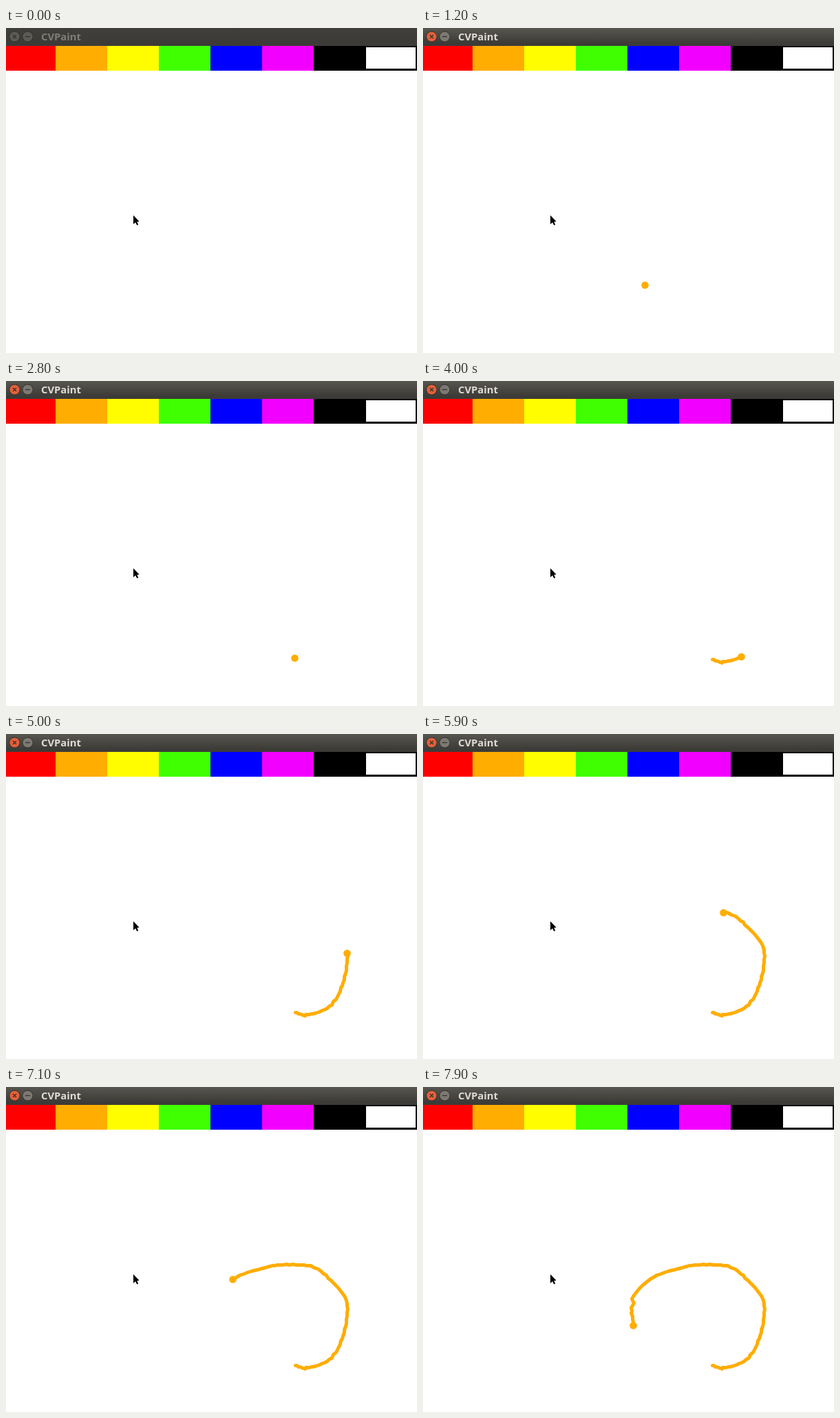
These frames come from a looping animation (597 by 472 pixels, 8000 ms). An HTML page with a canvas:

```html
<!DOCTYPE html>
<html lang="en">
<head>
<meta charset="utf-8">
<title>CVPaint</title>
<style>
  html, body { margin: 0; width: 100%; height: 100%; overflow: hidden; background: #fff; }
  canvas { display: block; }
</style>
</head>
<body>
<canvas id="stage" width="597" height="472"></canvas>
<script>
const ctx = document.getElementById('stage').getContext('2d');
const LOOP = 8000, STEP = 100, INK = '#ffad00';
const HOVER_START = 10, DRAW_START = 29;
const palette = ['#ff0000', INK, '#fffd00', '#40ff00', '#0000ff', '#f200ff'];

// Key poses of the brush: [step, x, y]
const hover = [[10, 318, 435], [12, 322, 373], [14, 336, 348], [18, 379, 370], [28, 419, 402]];
const stroke = [
  [29, 420, 404], [32, 432, 408], [36, 438, 407], [40, 462, 400], [43, 481, 381],
  [47, 493, 347], [50, 495, 318], [52, 491, 303], [54, 478, 287], [57, 457, 267],
  [59, 436, 259], [63, 398, 258], [68, 360, 266], [71, 329, 279], [74, 303, 307],
  [75, 306, 313], [76, 302, 320], [79, 305, 346]
];

// Smooth curve through the key poses
function pose(keys, step) {
  const i = Math.max(1, keys.findIndex(key => key[0] >= step));
  const a = keys[i - 1], b = keys[i];
  const before = keys[i - 2] || a, after = keys[i + 1] || b;
  const span = b[0] - a[0], k = (step - a[0]) / span;
  return [1, 2].map(axis => {
    const slopeA = (b[axis] - before[axis]) / (b[0] - before[0]) * span;
    const slopeB = (after[axis] - a[axis]) / (after[0] - a[0]) * span;
    const ease = k * k * (3 - 2 * k);
    return a[axis] + (b[axis] - a[axis]) * ease
      + slopeA * k * (1 - k) ** 2 - slopeB * k * k * (1 - k);
  });
}

// Slight hand tremor between whole steps, on the pixel grid
function trail(end) {
  const points = [];
  for (let s = DRAW_START; s <= end; s += 0.5) {
    const [x, y] = pose(stroke, s), shake = s % 1 ? 0.7 : 0;
    points.push([Math.round(x + shake * Math.sin(s * 7)), Math.round(y + shake * Math.cos(s * 5))]);
  }
  return points;
}

function disc(x, y, r, fill) {
  ctx.fillStyle = fill;
  ctx.beginPath();
  ctx.arc(x, y, r, 0, Math.PI * 2);
  ctx.fill();
}

function path(points) {
  ctx.beginPath();
  points.forEach(([x, y]) => ctx.lineTo(x, y));
}

function button(x, fill, glyph) {
  disc(x, 12.5, 7.9, '#33322e');
  disc(x, 12.5, 7.1, fill);
  ctx.strokeStyle = '#33322e';
  ctx.lineWidth = 1.3;
  ctx.stroke(new Path2D(glyph));
}

function titleBar(active) {
  const shade = ctx.createLinearGradient(0, 0, 0, 22);
  shade.addColorStop(0, active ? '#57564f' : '#403f3b');
  shade.addColorStop(1, '#3c3b37');
  ctx.fillStyle = shade;
  ctx.fillRect(0, 0, 597, 26);
  button(12.5, active ? '#e4603a' : '#5c5b56', 'M10 10l5 5M15 10l-5 5');
  button(31.5, active ? '#7b7971' : '#5c5b56', 'M28 12.5h7');
  ctx.fillStyle = active ? '#dfdbd2' : '#807d78';
  ctx.font = 'bold 14.8px "Open Sans", sans-serif';
  ctx.fontKerning = 'none';
  ctx.fillText('CVPaint', 51, 18);
}

function swatches() {
  ctx.fillStyle = '#000';
  ctx.fillRect(447, 26, 150, 36);
  palette.forEach((color, i) => {
    ctx.fillStyle = color;
    ctx.fillRect(i * 75 - 3, 26, 75, 36);
  });
  ctx.fillStyle = '#fff';
  ctx.fillRect(523, 28, 72, 31);
}

function pointer() {
  path([[185, 272], [185, 285], [188, 282.3], [190.2, 286.6], [192.2, 285.8], [190.3, 281.4], [193.6, 281]]);
  ctx.fillStyle = '#000';
  ctx.fill();
}

function brush(step) {
  if (step < HOVER_START) return;
  const drawing = step >= DRAW_START;
  const [x, y] = pose(drawing ? stroke : hover, step).map(Math.round);
  ctx.save();
  ctx.translate(0.5, 0.5);
  if (drawing) {
    path(trail(step));
    ctx.strokeStyle = INK;
    ctx.lineWidth = 5;
    ctx.lineCap = ctx.lineJoin = 'round';
    ctx.stroke();
  }
  disc(x, y, 5.3, INK);
  ctx.restore();
}

function render(now) {
  const t = now % LOOP;
  ctx.fillStyle = '#fff';
  ctx.fillRect(0, 0, 597, 472);
  titleBar(t >= 300);
  swatches();
  brush(Math.floor(t / STEP));
  pointer();
}

const start = performance.now();
(function tick() {
  render(performance.now() - start);
  requestAnimationFrame(tick);
})();
</script>
</body>
</html>
```
